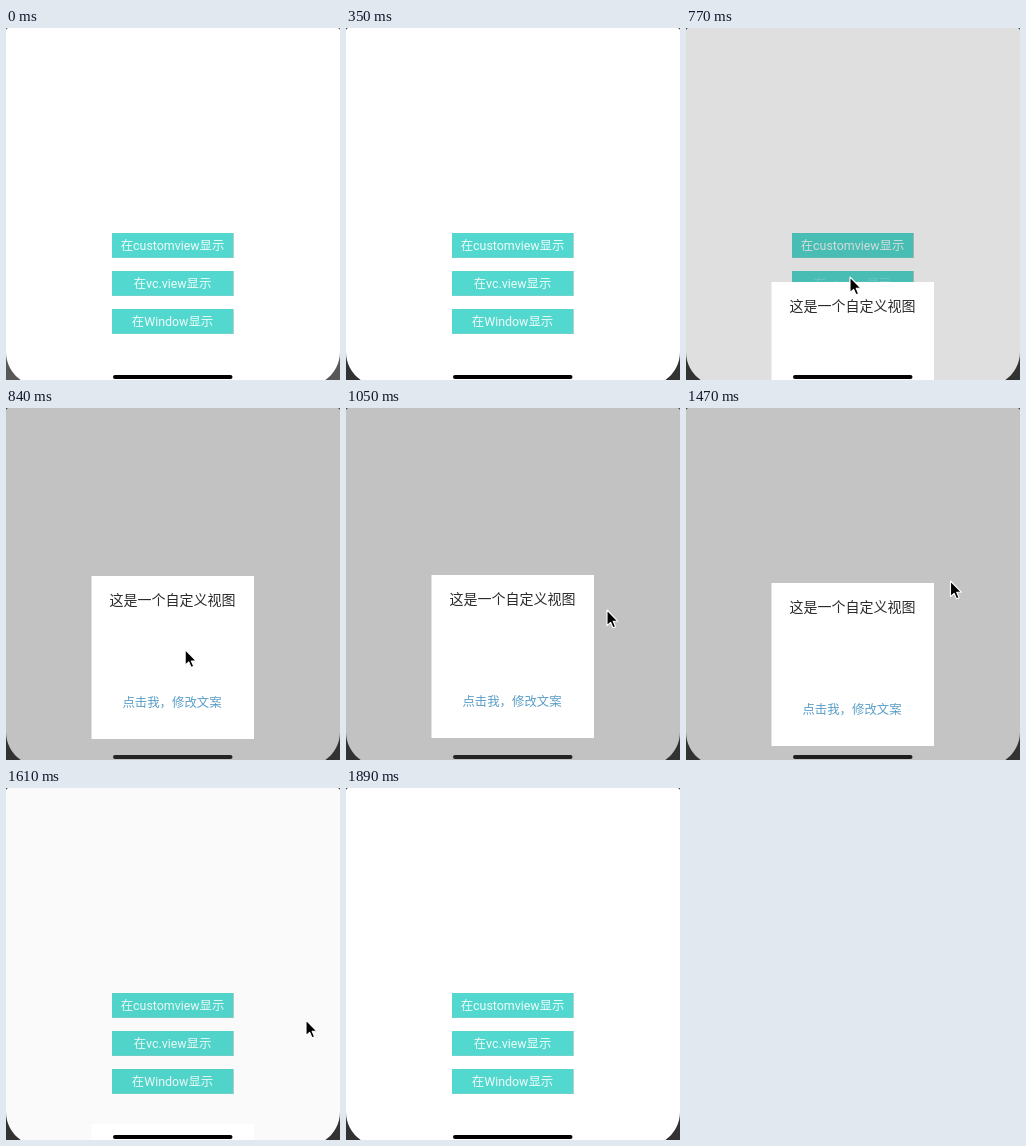
These frames come from a looping animation (334x352 px, 2030 ms). An HTML page:

```html
<!DOCTYPE html>
<html lang="zh-CN">
<head>
<meta charset="utf-8">
<style>
  html, body { margin: 0; width: 100%; height: 100%; overflow: hidden; background: #fff; }
  svg { display: block; width: 334px; height: 352px; }
  text { font-family: Roboto, "Noto Sans CJK SC", "Noto Sans CJK", sans-serif; text-anchor: middle; }
  .label { font-size: 12.4px; fill: #f0fdfb; }
</style>
</head>
<body>
<svg viewBox="0 0 334 352">
  <rect width="334" height="352" fill="#fff"/>
  <g id="buttons"></g>
  <rect id="dim" width="334" height="352" fill="#020100"/>
  <g id="sheet">
    <rect x="85.5" width="162.5" height="163" fill="#fff"/>
    <text x="166.5" y="29" font-size="14" fill="#2a2a2a">这是一个自定义视图</text>
    <text x="166" y="131" font-size="12.4" fill="#5a9dc8">点击我，修改文案</text>
  </g>
  <rect id="homeBar" x="107" y="347" width="119.5" height="4" rx="2"/>
  <path id="corners" d="M0 324A34 34 0 0 0 14.7 352H0Z M334 324A34 34 0 0 1 319.3 352H334Z M0 0H2Q.5 .5 0 2Z M334 0H332Q333.5 .5 334 2Z"/>
  <path id="cursor" d="M0 0V15.6L3.6 12.3L6 17.8L8.6 16.7L6.2 11.3H11Z" fill="#000" stroke="#fff" stroke-width="1.1" stroke-linejoin="round"/>
</svg>
<script>
const LOOP = 2030, STEP = 70;
const $ = id => document.getElementById(id);
const clamp = v => Math.min(1, Math.max(0, v));
const lerp = (a, b, k) => a + (b - a) * k;
const ramp = (t, start, length) => clamp((t - start) / length);
const ease = k => k * k * (3 - 2 * k);
const gray = v => `rgb(${v},${v},${v})`;

const LABELS = ['在customview显示', '在vc.view显示', '在Window显示'];
$('buttons').innerHTML = LABELS.map((label, i) => {
  const y = 205 + 38 * i;
  return `<rect x="106" y="${y}" width="122" height="25" fill="#b4cfcc"/>
    <rect x="106" y="${y}" width="121" height="24.7" fill="#52d8ce"/>
    <text class="label" x="166.5" y="${y + 16.8}">${label}</text>`;
}).join('');
const pressedLabel = document.querySelectorAll('.label')[1];

// Pointer stops: time, x, y of the tip
const PATH = [
  [350, 196, 356], [560, 164, 249], [770, 164, 249],
  [1050, 261, 202], [1330, 261, 202], [1400, 264.5, 173],
  [1540, 264.5, 173], [1610, 300, 232], [1680, 345, 270]
];

function pointerAt(t) {
  const i = PATH.findIndex(stop => stop[0] > t);
  if (i < 1) return [-40, -40];
  const [t0, x0, y0] = PATH[i - 1], [t1, x1, y1] = PATH[i];
  const k = ease((t - t0) / (t1 - t0));
  return [lerp(x0, x1, k), lerp(y0, y1, k)];
}

function draw(t) {
  const shown = ease(ramp(t, 689, 156)) - ease(ramp(t, 1445, 201));
  $('dim').setAttribute('opacity', 0.24 * shown);
  $('sheet').setAttribute('transform', `translate(0 ${Math.round(lerp(352, 167, shown))})`);
  $('homeBar').setAttribute('fill', gray(Math.round(lerp(2, 36, shown ** 4))));
  $('corners').setAttribute('fill', gray(Math.round(lerp(88, 50, ramp(t, 0, 350)))));

  const press = ramp(t, 600, 100) - ramp(t, 770, 200);
  pressedLabel.setAttribute('opacity', lerp(1, 0.25, press));

  $('cursor').setAttribute('transform', `translate(${pointerAt(t)})`);
}

const start = performance.now();
function tick() {
  const t = (performance.now() - start) % LOOP;
  draw(Math.min(1890, Math.floor(t / STEP) * STEP));
  requestAnimationFrame(tick);
}
tick();
</script>
</body>
</html>
```
